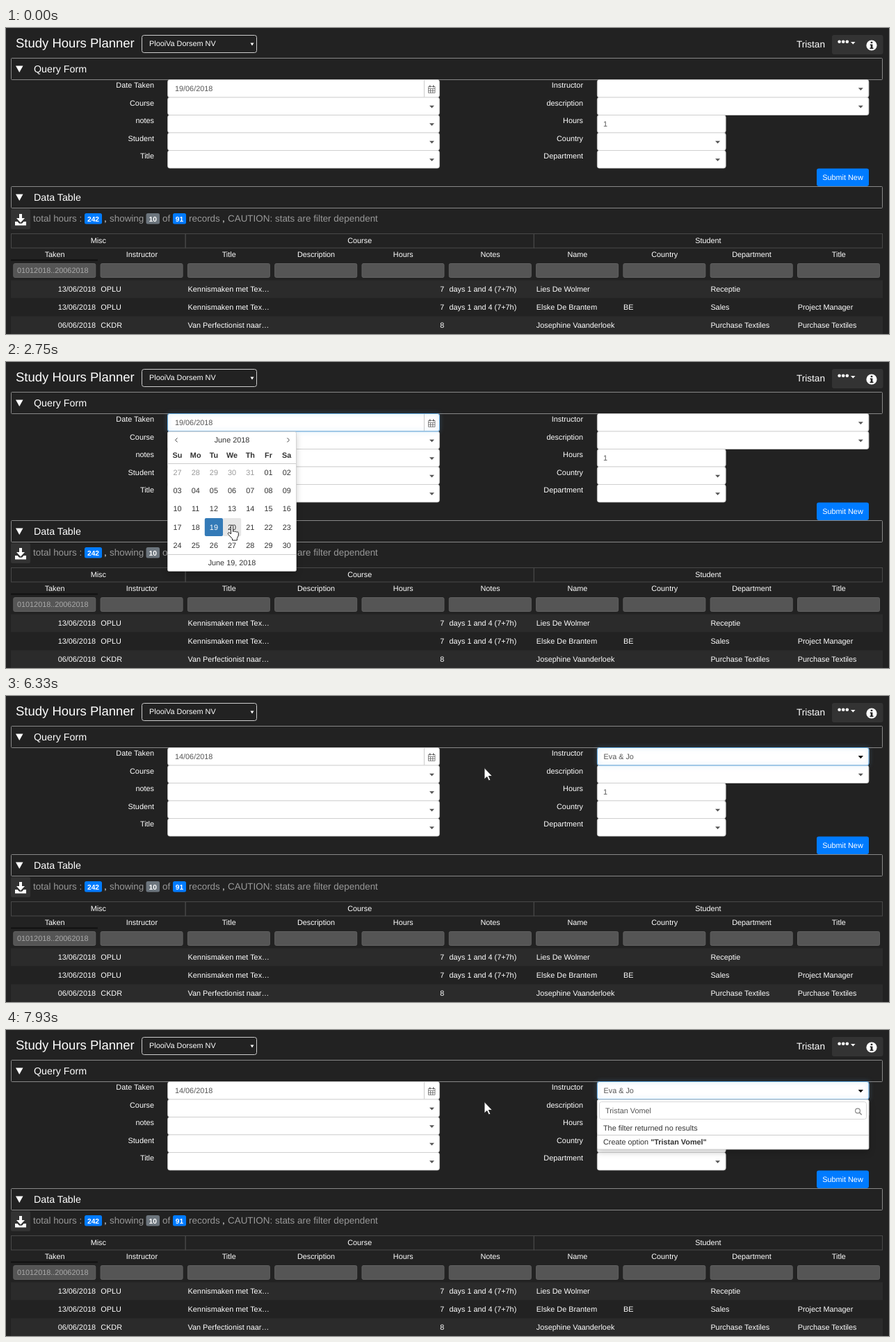
Recreate the animation shown at these times as an HTML page. Size 1270 by 441 pixels, loop 8 s.

```html
<!DOCTYPE html>
<html lang="en">
<head>
<meta charset="utf-8">
<title>Study Hours Planner</title>
<style>
  html, body { margin: 0; width: 100%; height: 100%; overflow: hidden; background: #222; }
  svg { display: block; width: 1270px; height: 441px; }
  text { font: 10.85px "Liberation Sans", Arial, sans-serif; fill: #fff; white-space: pre; text-rendering: geometricPrecision; }
  .mid { text-anchor: middle; }
  .end { text-anchor: end; }
  .bold { font-weight: bold; }
  .title { font-size: 18.5px; }
  .head { font-size: 14.25px; }
  .user { font-size: 13.6px; }
  .stat { font-size: 13.45px; }
  .badge { font-size: 10.2px; font-weight: bold; }
  .gray { fill: #999; }
  .hint { fill: #aaa; }
  .value { fill: #555; }
  .dark { fill: #333; }
  .field { fill: #fff; stroke: #ccc; stroke-width: .8; }
  .filter { fill: #555; stroke: #606060; }
  .panel { fill: #fff; stroke: #ccc; stroke-width: .8; }
  .rule { stroke: #ccc; }
  .popup { filter: drop-shadow(0 4px 4px rgba(0, 0, 0, .2)); }
  .glow { fill: none; stroke: #66afe9; filter: drop-shadow(0 0 3px rgba(102, 175, 233, .7)); }

  #calendar, #menu, #dateGlow, #nameGlow, #caret { animation: 8s infinite; }
  #calendar { animation-name: calendar; }
  #menu { animation-name: menu; }
  #dateGlow { animation-name: dateGlow; animation-timing-function: step-end; }
  #nameGlow { animation-name: nameGlow; animation-timing-function: step-end; }
  #caret { animation-name: caret; animation-timing-function: step-end; }

  @keyframes calendar {
    0%, 15.6% { transform: translateY(-225px); }
    18.1%, 56.9% { transform: none; }
    59.4%, 100% { transform: translateY(-225px); }
  }
  @keyframes menu {
    0%, 80.6% { transform: translateY(-190px); animation-timing-function: ease-out; }
    82.9%, 84.2% { transform: translateY(-2.6px); }
    84.4%, 100% { transform: none; }
  }
  @keyframes dateGlow { 0%, 73.75%, 100% { opacity: 0; } 15% { opacity: 1; } }
  @keyframes nameGlow { 0%, 100% { opacity: 0; } 73.75% { opacity: 1; } }
  @keyframes caret {
    0%, 23.2%, 33.5%, 45%, 56%, 69%, 100% { opacity: 0; }
    16%, 28.5%, 39%, 53%, 62% { opacity: 1; }
  }
</style>
</head>
<body>
<svg id="stage" viewBox="0 0 1270 441"></svg>
<script>
const LOOP = 8000;
const TYPED = 'Tristan Vomel';
const CELL = 26.2, CAL_X = 233.4, CAL_Y = 146.3;

const text = (x, y, str, cls = '', id = '') =>
  `<text x="${x}" y="${y}" class="${cls}"${id && ` id="${id}"`}>${str}</text>`;
const rect = (x, y, w, h, attrs = '', r = 0) =>
  `<rect x="${x}" y="${y}" width="${w}" height="${h}" rx="${r}" ${attrs}/>`;
const path = (d, attrs = '') => `<path d="${d}" ${attrs}/>`;
const fieldY = i => 74.5 + 25.5 * i;
const arrow = (x, y, color = '#555') => path(`M${x - 3.5} ${y}h7l-3.5 3.7z`, `fill="${color}"`);
const each = (list, fn) => list.map(fn).join('');

function header() {
  return text(14, 27.5, 'Study Hours Planner', 'title') +
    rect(195.5, 10.5, 165, 25, 'fill="#222" stroke="#ccc"', 3) +
    text(206, 26, 'PlooiVa Dorsem NV') + path('M351.5 21.5h5l-2.5 4z', 'fill="#fff"') +
    text(1178, 27.7, 'Tristan', 'user end') +
    rect(1188, 10, 73.5, 28, 'fill="#333"', 3) +
    each([1198.6, 1204.2, 1209.8], x => `<circle cx="${x}" cy="19.7" r="2.3" fill="#fff"/>`) +
    path('M1215 20h6.5l-3.2 3.4z', 'fill="#fff"') +
    '<circle cx="1245" cy="25" r="7.6" fill="#fff"/>' +
    path('M1243.7 19.7h2.6v2.4h-2.6zM1242.8 23.4h3.6v5h1.1v1.6h-5v-1.6h1.2v-3.4h-.9z', 'fill="#222"');
}

const section = (y, name) =>
  rect(7.5, y + .5, 1253, 31, 'fill="#222" stroke="#888"', 1) +
  path(`M14 ${y + 11.5}h10.5l-5.25 9.5z`, 'fill="#fff"') + text(40, y + 21, name, 'head');

function form() {
  const left = ['Date Taken', 'Course', 'notes', 'Student', 'Title'];
  const right = ['Instructor', 'description', 'Hours', 'Country', 'Department'];
  const label = (x, i, name) => text(x, 86.3 + 25.5 * i, name, 'end');
  const dateIcon = path('M601.5 75v24.5', 'class="rule"') +
    path('M607.5 84.5h9.500v9h-9.500zM607.5 87.500h9.500M610.5 87.500v6M613.8 87.500v6M607.5 90.500h9.500',
      'fill="none" stroke="#555" stroke-width=".7"') +
    path('M609.8 82.5v3M614.8 82.5v3', 'stroke="#444" stroke-width="1.2"');
  return each(left, (name, i) => label(213, i, name) +
      rect(232.6, fieldY(i), 390.8, 25.5, 'class="field"', 3) +
      (i ? arrow(612.5, fieldY(i) + 11.8) : dateIcon)) +
    each(right, (name, i) => {
      const w = i < 2 ? 390.5 : 184.8;
      return label(830, i, name) +
        rect(850.4, fieldY(i), w, 25.5, 'class="field"', 3) +
        (i === 2 ? '' : arrow(838.8 + w, fieldY(i) + 11.8));
    }) +
    text(859, 142, '1', 'value') +
    rect(1166, 202.5, 75, 25.5, 'fill="#007bff"', 3) + text(1203.5, 219, 'Submit New', 'mid') +
    rect(232.5, 74.5, 391, 25.5, 'class="glow" id="dateGlow"', 3) +
    '<g id="nameGlow">' + rect(850.5, 74.5, 390.5, 25.5, 'class="glow"', 3) +
    arrow(1229.3, 86.3, '#000') + '</g>' +
    text(243, 90.7, '', 'value', 'date') + text(859.5, 90.7, '', 'value', 'name') +
    path('M297.5 81.5v12', 'stroke="#222" id="caret"');
}

function stats() {
  const badge = (x, w, n, color) =>
    rect(x, 267, w, 15.5, `fill="${color}"`, 2.5) + text(x + w / 2, 278.5, n, 'badge mid');
  const words = [[39, 'total hours :'], [149, 'showing'], [225, 'of'], [263, 'records'],
    [319, 'CAUTION: stats are filter dependent']];
  return rect(7, 261, 28, 29, 'fill="#333"', 2) +
    path('M19 268h4v6h4l-6 6.5-6-6.5h4zM13 279h3.5l2.5 2.8h4l2.5-2.8H29v5.5H13z', 'fill="#fff"') +
    each(words, ([x, s]) => text(x, 278.5, s, 'stat gray')) +
    each([141, 311], x => text(x, 278.5, ',', 'stat')) +
    badge(113, 25, 242, '#007bff') + badge(201.5, 19.5, 10, '#6c757d') + badge(240, 19, 91, '#007bff');
}

function table() {
  const colX = i => 7.5 + 125.3 * i;
  const groups = [[0, 2, 'Misc'], [2, 6, 'Course'], [6, 10, 'Student']];
  const cols = ['Taken', 'Instructor', 'Title', 'Description', 'Hours', 'Notes', 'Name', 'Country', 'Department', 'Title'];
  const intro = ['13/06/2018', 'OPLU', 'Kennismaken met Tex…', '', '7', 'days 1 and 4 (7+7h)'];
  const rows = [
    [...intro, 'Lies De Wolmer', '', 'Receptie', ''],
    [...intro, 'Elske De Brantem', 'BE', 'Sales', 'Project Manager'],
    ['06/06/2018', 'CKDR', 'Van Perfectionist naar…', '', '8', '', 'Josephine Vaanderloek', '', 'Purchase Textiles', 'Purchase Textiles'],
  ];
  const cell = (s, c, y) => c === 0 || c === 4
    ? text(colX(c) + 121.5, y, s, 'end') : text(colX(c) + 3.5, y, s);
  return each(groups, ([a, b, s]) =>
      rect(colX(a), 296.5, colX(b) - colX(a), 20.5, 'fill="none" stroke="#484848"') +
      text((colX(a) + colX(b)) / 2, 310, s, 'mid')) +
    each(cols, (s, i) => text(colX(i) + 62.6, 330, s, 'mid') +
      rect(colX(i) + 3.3, 339.5, 118, 20, 'class="filter"', 2)) +
    rect(7, 333.5, 125, 2, 'fill="#111"') +
    text(16, 353, '01012018..20062018', 'hint') +
    each(rows, (row, r) =>
      rect(7, 363.5 + 26 * r, 1254, 26, `fill="${r % 2 ? '#222' : '#2b2b2b'}"`) +
      each(row, (s, c) => cell(s, c, 380 + 26 * r)));
}

function calendar() {
  const mid = i => CAL_X + CELL * (i + .5);
  const day = (_, i) => {
    const n = i < 5 ? 27 + i : i - 4;
    const cls = i < 5 ? 'gray' : i === 23 ? '' : 'dark';
    return text(mid(i % 7), 163 + CELL * Math.floor(i / 7), String(n).padStart(2, '0'), 'mid ' + cls);
  };
  return '<g clip-path="url(#below)"><g id="calendar"><g class="popup">' +
    rect(232.5, 100.5, 185, 201, 'class="panel"', 2) + '</g>' +
    path('M246.5 109.5l-3 3 3 3M404.5 109.5l3 3-3 3', 'fill="none" stroke="#444"') +
    text(325, 116, 'June 2018', 'mid dark') +
    each(['Su', 'Mo', 'Tu', 'We', 'Th', 'Fr', 'Sa'], (s, i) => text(mid(i), 138, s, 'mid bold dark')) +
    path('M233 146.5h184M233 277.5h184', 'class="rule"') +
    rect(0, 0, CELL, CELL, 'fill="#e6e6e6" id="hover"', 2) +
    rect(CAL_X + 2 * CELL, CAL_Y + 3 * CELL, CELL, CELL, 'fill="#337ab7"', 2) +
    each([...Array(35)], day) +
    text(325, 293, 'June 19, 2018', 'mid dark') + '</g></g>';
}

function menu() {
  const names = ['CKDR', 'Calvor', 'Eva &amp; Jo', 'Eva &amp; Sabine', 'Eva Ulmeri', 'Geer Molvaart', 'Jo Kettels'];
  const panel = h => '<g class="popup">' + rect(850.5, 100.5, 390.5, h, 'class="panel"', 2) + '</g>';
  const list = panel(165.5) +
    rect(851, 171.8, 378, 20.7, 'fill="#337ab7"') +
    '<g clip-path="url(#listArea)">' +
    each(names, (s, i) => text(859.5, 144.6 + 20.65 * i, s, i === 2 ? '' : 'value')) + '</g>' +
    rect(1229, 130.6, 11.5, 135, 'fill="#f1f1f1"') + rect(1230, 142.6, 9.5, 15.5, 'fill="#c1c1c1"') +
    path('M1232 138.5h5l-2.5-3z', 'fill="#a3a3a3"') + path('M1232 258.5h5l-2.5 3z', 'fill="#505050"');
  const none = panel(71.5) + path('M851 151.5h390', 'class="rule"') +
    text(859, 144.7, 'The filter returned no results', 'dark') +
    text(859, 165, 'Create option <tspan class="bold" id="option"></tspan>', 'dark');
  return `<g clip-path="url(#below)"><g id="menu"><g id="list">${list}</g><g id="none">${none}</g>` +
    rect(853.5, 103.5, 384, 25, 'class="field"', 3) +
    '<circle cx="1225" cy="116.5" r="3.4" fill="none" stroke="#888" stroke-width="1.2"/>' +
    path('M1227.5 119l3.2 3.2', 'stroke="#888" stroke-width="1.5"') +
    text(862, 120, '', 'value', 'query') + '</g></g>';
}

const pointer = '<g id="pointer">' +
  path('M0 0V16.5L3.8 13 6.4 18.5 8.8 17.4 6.3 12H11.5Z', 'id="plain" fill="#fff" stroke="#222" stroke-width=".9"') +
  path('M-1.5 1.5a1.5 1.5 0 0 1 3 0V9.5a1.5 1.5 0 0 1 2.7.3 1.5 1.5 0 0 1 2.6.6 1.4 1.4 0 0 1 2.5.9V15l-2 4.5V22H.5v-2.3L-5.3 13.4a1.5 1.5 0 0 1 2.2-2.1L-1.5 13Z',
    'id="hand" fill="#fff" stroke="#222"') +
  path('M-3.5-8H-1Q0-8 0-7V7Q0 8-1 8H-3.5M3.5-8H1Q0-8 0-7V7Q0 8 1 8H3.5', 'id="beam" fill="none" stroke="#222"') + '</g>';

const stage = document.getElementById('stage');
stage.innerHTML = '<defs><clipPath id="below">' + rect(220, 100, 1050, 341) + '</clipPath>' +
  '<clipPath id="listArea">' + rect(851, 130, 378, 135.6) + '</clipPath></defs>' +
  header() + section(43, 'Query Form') + form() + section(228, 'Data Table') +
  stats() + table() + calendar() + menu() + pointer;

const get = id => document.getElementById(id);
const show = (id, on) => get(id).setAttribute('visibility', on ? 'visible' : 'hidden');
const move = (id, x, y) => get(id).setAttribute('transform', `translate(${x} ${y})`);

// Pointer stops: time, x, y
const stops = [
  [100, 973, 333], [500, 700, 180], [900, 531, 92], [1020, 560, 92], [1200, 611, 88], [1450, 611, 89],
  [1750, 522, 104], [1850, 522, 104], [2350, 332, 272], [2480, 330, 270], [2750, 325, 235], [2850, 325, 235],
  [3200, 275, 236], [3500, 334, 230], [3650, 280, 232], [4050, 325, 213], [4150, 325, 213], [4450, 350, 212],
  [4620, 350, 212], [5270, 637, 115], [5470, 637, 115], [5800, 688, 103.5],
];

function pointerAt(t) {
  const i = stops.findIndex(s => s[0] > t);
  if (i < 0) return stops.at(-1).slice(1);
  if (i === 0) return stops[0].slice(1);
  const [t0, x0, y0] = stops[i - 1], [t1, x1, y1] = stops[i];
  const u = (t - t0) / (t1 - t0), k = u * u * (3 - 2 * u);
  return [x0 + (x1 - x0) * k, y0 + (y1 - y0) * k];
}

function typedCount(t) {
  if (t < 6760) return 0;
  if (t < 7130) return Math.min(3, 1 + Math.floor((t - 6760) / 110));
  return Math.min(TYPED.length, 4 + Math.floor((t - 7130) / 80));
}

function render(t) {
  const [x, y] = pointerAt(t);
  const open = t > 1450 && t < 4650;
  const col = Math.floor((x - CAL_X) / CELL), row = Math.floor((y - CAL_Y) / CELL);
  const overDay = open && col >= 0 && col < 7 && row >= 0 && row < 5;
  const overDate = y > 75 && y < 100 && x < 624;
  const overIcon = overDate && x > 601;
  const shape = overDay || overIcon ? 'hand' : overDate ? 'beam' : 'plain';
  for (const id of ['plain', 'hand', 'beam']) show(id, t >= 100 && id === shape);
  move('pointer', x, y);
  show('hover', overDay);
  move('hover', CAL_X + CELL * col, CAL_Y + CELL * row);

  const query = TYPED.slice(0, typedCount(t));
  get('date').textContent = t < 4550 ? '19/06/2018' : '14/06/2018';
  get('name').textContent = t < 6260 ? '' : 'Eva & Jo';
  get('query').textContent = query;
  get('option').textContent = `"${query}"`;
  show('list', !query);
  show('none', query);
}

let start;
function tick(now) {
  start ??= now;
  render((now - start) % LOOP);
  requestAnimationFrame(tick);
}
render(0);
requestAnimationFrame(tick);
</script>
</body>
</html>
```
